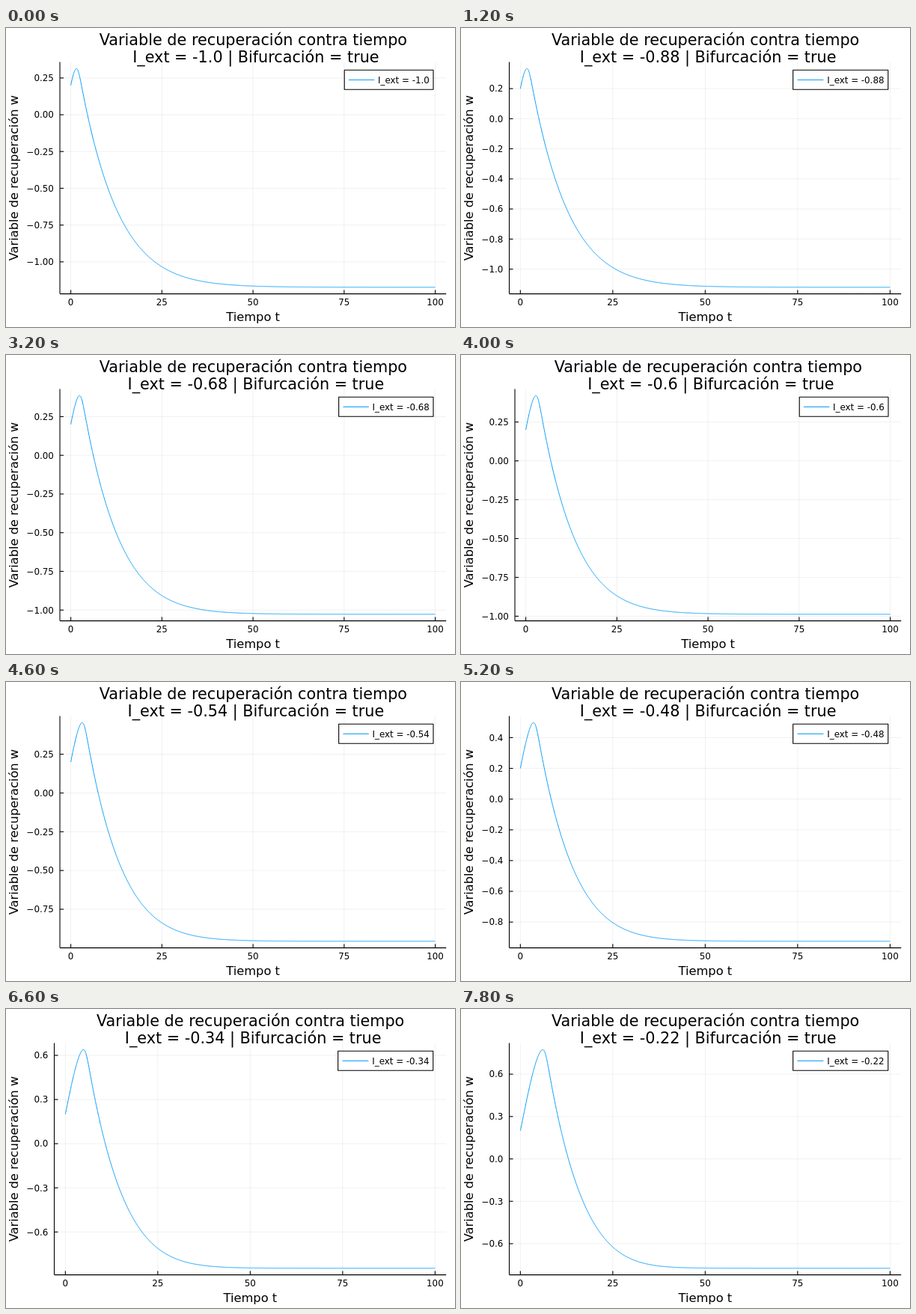
These frames come from a looping animation (600x400 px, 8 s). An HTML page with a canvas:

```html
<!DOCTYPE html>
<html lang="es">
<head>
<meta charset="utf-8">
<title>Variable de recuperación</title>
<style>
html, body { margin: 0; width: 100%; height: 100%; overflow: hidden; background: #fff; }
canvas { display: block; width: 600px; height: 400px; }
</style>
</head>
<body>
<canvas id="stage" width="600" height="400"></canvas>
<script>
const ctx = document.getElementById('stage').getContext('2d');
const STEP_MS = 200, STEPS = 40;
const RIGHT = 588.2, TOP = 45.6, BOTTOM = 355.6;
const T_MAX = 100, DT = 0.05;
const BLUE = '#009afa', GRID = 'rgba(0,0,0,0.06)';
const SMALL = 11.85, MEDIUM = 16.3, LARGE = 20.75;

// FitzHugh-Nagumo model, integrated with RK4; returns w over time
function solve(current) {
  const rate = (v, w) => [v - v * v * v / 3 - w + current, 0.08 * (v + 0.7 - 0.8 * w)];
  let v = 1, w = 0.2;
  const ws = [w];
  for (let i = 0; i < T_MAX / DT; i++) {
    const a = rate(v, w);
    const b = rate(v + a[0] * DT / 2, w + a[1] * DT / 2);
    const c = rate(v + b[0] * DT / 2, w + b[1] * DT / 2);
    const d = rate(v + c[0] * DT, w + c[1] * DT);
    v += DT / 6 * (a[0] + 2 * b[0] + 2 * c[0] + d[0]);
    w += DT / 6 * (a[1] + 2 * b[1] + 2 * c[1] + d[1]);
    ws.push(w);
  }
  return ws;
}

// Scores each candidate step by tick count, coverage and niceness
function pickTicks(lo, hi) {
  const choices = [[1, 1], [0.5, 0.9], [0.2, 0.7], [0.25, 0.5], [0.3, 0.2]];
  let best = null;
  for (const [step, nice] of choices) {
    const first = Math.ceil(lo / step), last = Math.floor(hi / step);
    const n = last - first + 1;
    if (n < 4 || n > 8) continue;
    const score = (1 - Math.abs(n - 5) / 5) / 4 + (hi - lo) / (2 * (n - 1) * step) + nice / 4;
    if (!best || score > best.score) best = { score, step, first, last };
  }
  return best;
}

function buildPlot(index) {
  const current = -1 + index * 0.02;
  const ws = solve(current);
  const min = Math.min(...ws), max = Math.max(...ws);
  const pad = 0.03 * (max - min);
  const lo = min - pad, hi = max + pad;
  const ticks = pickTicks(lo, hi);
  const decimals = ticks.step === 0.25 ? 2 : 1;
  return {
    ws, lo, hi, ticks, decimals,
    left: decimals === 2 ? 72 : 64.5,
    label: 'I_ext = ' + current.toFixed(2).replace(/0$/, '')
  };
}

function setFont(size, align) {
  ctx.font = size + 'px "DejaVu Sans", sans-serif';
  ctx.textAlign = align;
}

function text(str, x, y, size, align) {
  setFont(size, align);
  ctx.fillStyle = '#000';
  ctx.fillText(str, x, y);
}

function line(x1, y1, x2, y2, color, width) {
  ctx.strokeStyle = color;
  ctx.lineWidth = width;
  ctx.beginPath();
  ctx.moveTo(x1, y1);
  ctx.lineTo(x2, y2);
  ctx.stroke();
}

// Legend paddings scale with the plot width; the box hugs the ink of its label
function drawLegend(label, width) {
  const unit = width / 45, right = RIGHT - width / 30;
  setFont(SMALL, 'left');
  const ink = ctx.measureText(label);
  const x = right - unit / 2 - ink.actualBoundingBoxLeft - ink.actualBoundingBoxRight;
  const left = x - 4 * unit;
  ctx.fillStyle = '#fff';
  ctx.fillRect(left, 56.3, right - left, 26);
  ctx.strokeStyle = '#000';
  ctx.lineWidth = 1.1;
  ctx.strokeRect(left, 56.3, right - left, 26);
  line(x - 3.5 * unit, 69.4, x - 0.5 * unit, 69.4, BLUE, 1);
  text(label, x + ink.actualBoundingBoxLeft, 74, SMALL, 'left');
}

function draw(plot) {
  const { ws, lo, hi, ticks, decimals, left, label } = plot;
  const width = RIGHT - left, mid = (left + RIGHT) / 2;
  const px = t => left + width * (0.03 + t / T_MAX) / 1.06;
  const py = w => BOTTOM - (w - lo) / (hi - lo) * (BOTTOM - TOP);

  ctx.fillStyle = '#fff';
  ctx.fillRect(0, 0, 600, 400);

  for (let t = 0; t <= T_MAX; t += 25) {
    const x = px(t);
    line(x, TOP, x, BOTTOM, GRID, 1);
    line(x, BOTTOM, x, BOTTOM - 5, '#000', 1.1);
    text(String(t), x, 371, SMALL, 'center');
  }
  for (let i = ticks.first; i <= ticks.last; i++) {
    const value = i * ticks.step, y = py(value);
    line(left, y, RIGHT, y, GRID, 1);
    line(left, y, left + 5, y, '#000', 1.1);
    const sign = i < 0 ? '\u2212' : '';
    text(sign + Math.abs(value).toFixed(decimals), left - 8.2, y + 4.3, SMALL, 'right');
  }
  line(left, BOTTOM, RIGHT, BOTTOM, '#000', 1.1);
  line(left, TOP, left, BOTTOM, '#000', 1.1);

  ctx.strokeStyle = BLUE;
  ctx.lineWidth = 1;
  ctx.lineJoin = 'round';
  ctx.beginPath();
  ws.forEach((w, i) => ctx.lineTo(px(i * DT), py(w)));
  ctx.stroke();

  text('Variable de recuperación contra tiempo', mid + 0.3, 23, LARGE, 'center');
  text(label + ' | Bifurcación = true', mid + 3.8, 46, LARGE, 'center');
  text('Tiempo t', mid, 392, MEDIUM, 'center');
  ctx.save();
  ctx.translate(16, (TOP + BOTTOM) / 2);
  ctx.rotate(-Math.PI / 2);
  text('Variable de recuperación w', 0, 0, MEDIUM, 'center');
  ctx.restore();

  drawLegend(label, width);
}

const plots = Array.from({ length: STEPS }, (_, i) => buildPlot(i));
const start = performance.now();

function tick() {
  const elapsed = Math.max(0, performance.now() - start);
  draw(plots[Math.floor(elapsed / STEP_MS) % STEPS]);
  requestAnimationFrame(tick);
}
tick();
</script>
</body>
</html>
```
